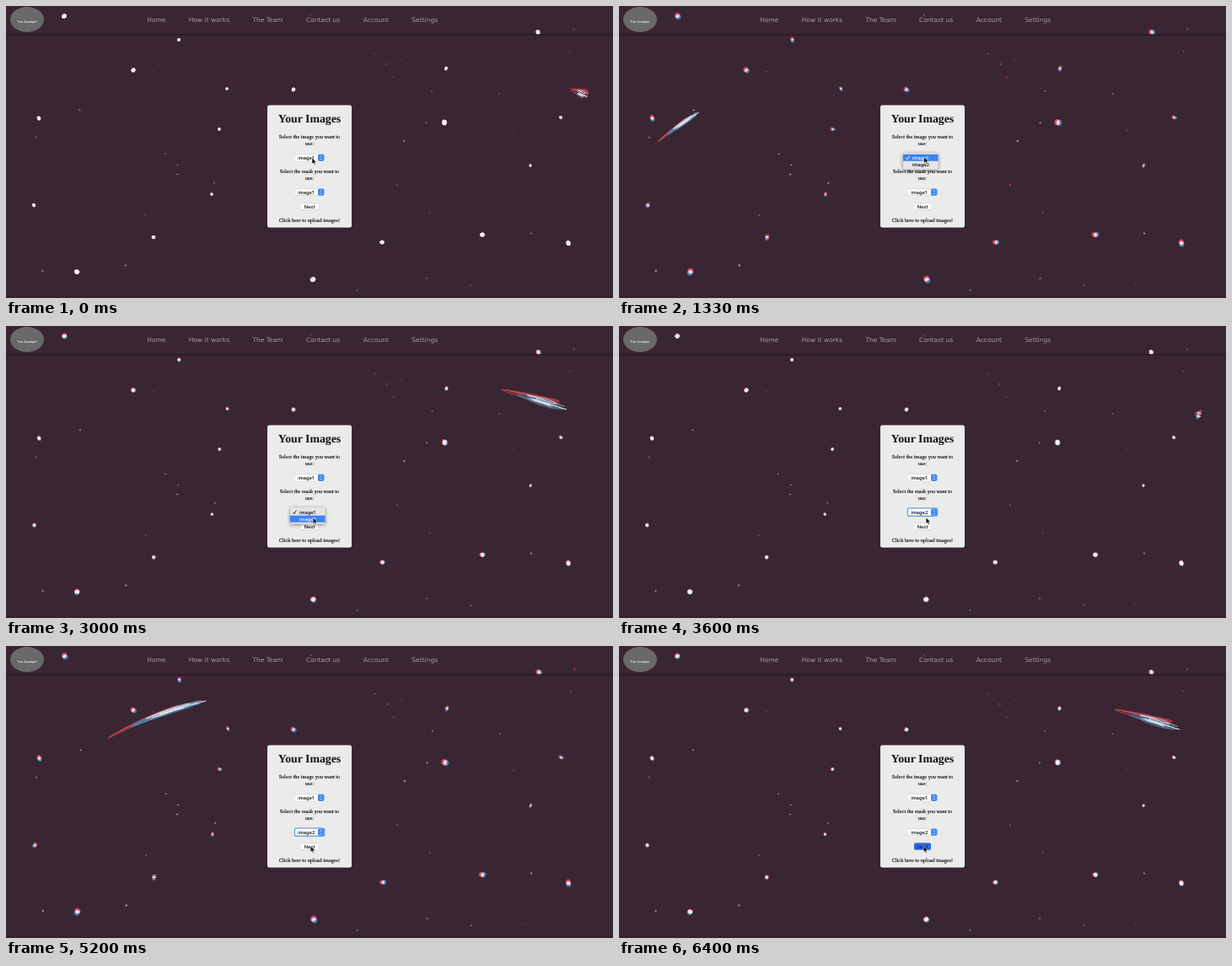
These frames come from a looping animation (720x346 px, 6470 ms). An HTML page with a canvas:

```html
<!DOCTYPE html>
<html lang="en">
<head>
<meta charset="utf-8">
<title>Your Images</title>
<style>
  html, body { margin: 0; width: 100%; height: 100%; overflow: hidden; background: #392632; }
  canvas, svg { position: absolute; left: 0; top: 0; width: 720px; height: 346px; }
  text { text-rendering: geometricPrecision; }
  .nav { font: 7.5px "DejaVu Sans", Verdana, sans-serif; fill: #a29ca3; }
  .logo { font: 4px "Liberation Sans", Arial, sans-serif; fill: #fff; text-anchor: middle; }
  .title { font: bold 13.8px "Liberation Serif", Times, serif; fill: #111; text-anchor: middle; }
  .copy { font: 6.25px "Liberation Serif", Times, serif; stroke: #000; stroke-width: .12px; text-anchor: middle; }
  .ui { font: 500 5.7px Inter, sans-serif; }
</style>
</head>
<body>
<canvas width="720" height="346"></canvas>
<svg viewBox="0 0 720 346"></svg>
<script>
const LOOP = 6470, FRAME = 1000 / 15, SKY_FRAMES = 51;
const ctx = document.querySelector('canvas').getContext('2d');
const svg = document.querySelector('svg');

const rnd = i => { const v = Math.sin(i * 127.1 + 3.7) * 43758.5453; return v - Math.floor(v); };
const ease = u => { u = Math.min(1, Math.max(0, u)); return u * u * u * (u * (6 * u - 15) + 10); };
const mix = (a, b, k) => a + (b - a) * k;

// ---------- sky ----------
// main stars, largest first
const stars = [
  [520, 138], [364, 324], [84, 315], [667, 281], [69, 12], [565, 271], [631, 31], [151, 76], [446, 280], [39, 133],
  [341, 99], [175, 274], [33, 236], [522, 74], [205, 40], [658, 132], [253, 146], [262, 98], [244, 223], [622, 189]
].map(([x, y], i) => ({ x, y, r: 3.4 - i * .09, dir: rnd(i) * 2.2 }));

const speckColors = ['#c94452', '#568fa9', '#d8c9d0'];
const specks = Array.from({ length: 33 }, (_, i) => ({
  x: 17 + 683 * rnd(i + 300), y: 8 + 330 * rnd(i + 500),
  r: .7 + .5 * rnd(i + 700), color: speckColors[i % 3]
}));

function blob(x, y, rx, ry, turn, color) {
  ctx.fillStyle = color;
  ctx.beginPath();
  ctx.ellipse(x, y, rx, ry, turn, 0, 7);
  ctx.fill();
}

function drawStars(split) {
  specks.forEach(({ x, y, r, color }, i) => {
    ctx.globalAlpha = .5 + .25 * split;
    blob(x + 1.3 * split * rnd(i), y, r, r * 1.2, i, color);
  });
  ctx.globalAlpha = 1;
  stars.forEach(({ x, y, r, dir }, i) => {
    const shift = .25 + .9 * split, size = r * (.85 + .1 * split);
    const dx = Math.cos(dir) * shift, dy = Math.sin(dir) * shift;
    const cx = x + 1.4 * split * rnd(i + 40), cy = y;
    ctx.globalCompositeOperation = 'lighter';
    blob(cx - dx, cy - dy, size, size * 1.15, i, 'rgb(155,35,42)');
    blob(cx + dx, cy + dy, size, size * 1.15, i * 2, 'rgb(20,95,120)');
    ctx.globalCompositeOperation = 'source-over';
    const core = r * (.9 - .4 * split);
    blob(cx, cy, core * .9, core * 1.1, i, '#f6eef0');
  });
}

// flight path, highest at x = 400
const arc = x => 50 + (x < 400 ? 70 * ((400 - x) / 297) ** 2.64 : 50 * ((x - 400) / 272) ** 1.8);

function drawComet(phase, split) {
  const p = phase < 4 ? phase + SKY_FRAMES : phase;
  if (p < 12) return;
  const travel = ease((p - 11.3) / 40.7);
  const head = 50 + 640 * travel;
  const tail = 40 + 645 * ease((p - 16.3) / 40.7);
  const half = 3.5 + 4.5 * travel;

  const strands = (count, seed, from, to, spread, color, alpha) => {
    ctx.strokeStyle = color;
    ctx.globalAlpha = alpha;
    for (let i = 0; i < count; i++) {
      const side = (2 * rnd(seed + i) - 1) * spread;
      const a = from + .25 * rnd(seed + i + 30), b = to - .25 * rnd(seed + i + 60);
      ctx.lineWidth = .6 + .7 * rnd(seed + i + 90);
      ctx.beginPath();
      for (let s = a; s <= b; s += .03) {
        const x = mix(tail, head, s), slope = arc(x + .5) - arc(x - .5), n = Math.hypot(1, slope);
        const swell = half * s ** .8 * Math.sqrt(Math.min(1, (1 - s) * 5 + .1));
        const off = swell * (side + .14 * Math.sin(s * 11 + i * 2));
        ctx.lineTo(x - slope / n * off, arc(x) + off / n);
      }
      ctx.stroke();
    }
  };
  ctx.lineCap = ctx.lineJoin = 'round';
  strands(10, 200, 0, 1 - .25 * split, 1, '#c8424f', .75);
  strands(20, 400, .25, 1, .95, '#4a84a4', .15 + .8 * split);
  strands(7, 600, .4, 1, .6, '#e6e6ee', .9);
  ctx.globalAlpha = 1;
}

function drawSky(phase) {
  const split = Math.min(1, 1.2 * Math.sin(Math.PI * phase / SKY_FRAMES));
  ctx.fillStyle = '#392632';
  ctx.fillRect(0, 0, 720, 346);
  drawStars(split);
  drawComet(phase, split);
}

// ---------- page ----------
const text = (cls, x, y, str, extra = '') => `<text class="${cls}" x="${x}" y="${y}" ${extra}>${str}</text>`;
const rect = (x, y, w, h, r, fill, extra = '') =>
  `<rect x="${x}" y="${y}" width="${w}" height="${h}" rx="${r}" fill="${fill}" ${extra}/>`;
const shade = 'style="filter:drop-shadow(0 .4px .5px #0007)"';

const select = (n, y) =>
  rect(342.4, y - 4.7, 35.4, 9.4, 2, 'none', `id="ring${n}" stroke="#5b9df0" stroke-width="1.2"`) +
  rect(343, y - 4, 34.3, 8, 1.6, '#fff', shade) +
  rect(370, y - 4, 7.3, 8, 1.6, '#3987ee') +
  `<path d="M372.4 ${y - .9}l1.3 -1.4l1.3 1.4M372.4 ${y + .9}l1.3 1.4l1.3 -1.4" fill="none" stroke="#fff" stroke-width=".7"/>` +
  text('ui', 346.3, y + 2, 'image1', `id="value${n}"`);

const menu = (n, y) =>
  `<g id="menu${n}">` +
  rect(337, y - 5.6, 41.5, 19.6, 2, '#e6e5e6', 'style="filter:drop-shadow(0 1.5px 2px #0007)"') +
  rect(337, y - 4, 41.5, 8, 0, '#3b82f3', `id="bar${n}"`) +
  `<path id="tick${n}" d="M340.3 ${y + .3}l1.4 1.7l2.6 -4" fill="none" stroke-width=".9"/>` +
  text('ui', 348, y + 2, 'image1', `id="a${n}"`) +
  text('ui', 348, y + 10, 'image2', `id="b${n}"`) + '</g>';

const links = ['Home', 'How it works', 'The Team', 'Contact us', 'Account', 'Settings'];
const SELECT_Y = [179.7, 220.6];

svg.innerHTML =
  rect(0, 33.2, 720, 1.8, 0, '#1c1018', 'opacity=".5"') +
  rect(0, 343, 720, 1.5, 0, '#1c1018', 'opacity=".25"') +
  '<ellipse cx="25" cy="16" rx="20" ry="15" fill="#696969"/>' +
  text('logo', 25, 20, 'The Sweeper') +
  text('nav', 167.3, 19, links.map((name, i) => `<tspan dx="${i ? 27.4 : 0}">${name}</tspan>`).join('')) +
  rect(310, 117.5, 100, 145, 2.5, '#ebebeb') +
  text('title', 360, 138, 'Your Images') +
  ['image', 'mask'].map((kind, i) =>
    text('copy', 360, 157 + 41 * i, `Select the ${kind} you want to`) +
    text('copy', 360, 165 + 41 * i, 'use:')).join('') +
  text('copy', 360, 256, 'Click here to upload images!') +
  SELECT_Y.map((y, i) => select(i + 1, y)).join('') +
  rect(350, 233.4, 20, 8.2, 1.6, '#fff', 'id="next" ' + shade) +
  text('ui', 360, 239.6, 'Next', 'id="nextText" text-anchor="middle"') +
  SELECT_Y.map((y, i) => menu(i + 1, y)).join('') +
  '<path id="cursor" d="M0 0V7.2L1.7 5.7L2.8 8.2L4 7.7L2.9 5.3H5.2Z" stroke="#fff" stroke-width=".5"/>';

const el = {};
svg.querySelectorAll('[id]').forEach(e => el[e.id] = e);
const show = (id, on) => el[id].style.display = on ? '' : 'none';

function drawMenu(n, open, row) {
  const [first, second] = row ? ['#000', '#fff'] : ['#fff', '#000'];
  show('menu' + n, open);
  el['bar' + n].setAttribute('y', SELECT_Y[n - 1] - 4 + row * 8);
  el['a' + n].setAttribute('fill', first);
  el['b' + n].setAttribute('fill', second);
  el['tick' + n].setAttribute('stroke', first);
}

// cursor stops: arrival time, x, y
const stops = [[500, 361.8, 179], [2130, 364, 220], [2930, 364.2, 227], [4000, 361.3, 237]];

function drawPage(t) {
  let x = 363, y = 180;
  for (const [at, toX, toY] of stops) {
    const k = ease((t - at) / 400 + 1);
    x = mix(x, toX, k);
    y = mix(y, toY, k);
  }
  el.cursor.setAttribute('transform', `translate(${x} ${y})`);

  const secondOpens = 2600, chosen = 3470, pressed = t >= 6260;
  drawMenu(1, t >= 530 && t < 1730, 0);
  drawMenu(2, t >= secondOpens && t < chosen, y > 224.5 ? 1 : 0);
  show('ring1', t >= 1730 && t < secondOpens);
  show('ring2', t >= chosen && !pressed);
  el.value2.textContent = t < chosen ? 'image1' : 'image2';
  el.next.setAttribute('fill', pressed ? '#2c68df' : '#fff');
  el.nextText.setAttribute('fill', pressed ? '#0d2a66' : '#000');
}

const start = performance.now();
function draw() {
  const t = (performance.now() - start) % LOOP;
  let frame = Math.floor((t + 4) / FRAME);
  if (frame === 1) frame = 0; // the first pose is held twice as long
  drawSky(frame % SKY_FRAMES);
  drawPage(frame * FRAME);
  requestAnimationFrame(draw);
}
draw();
</script>
</body>
</html>
```
